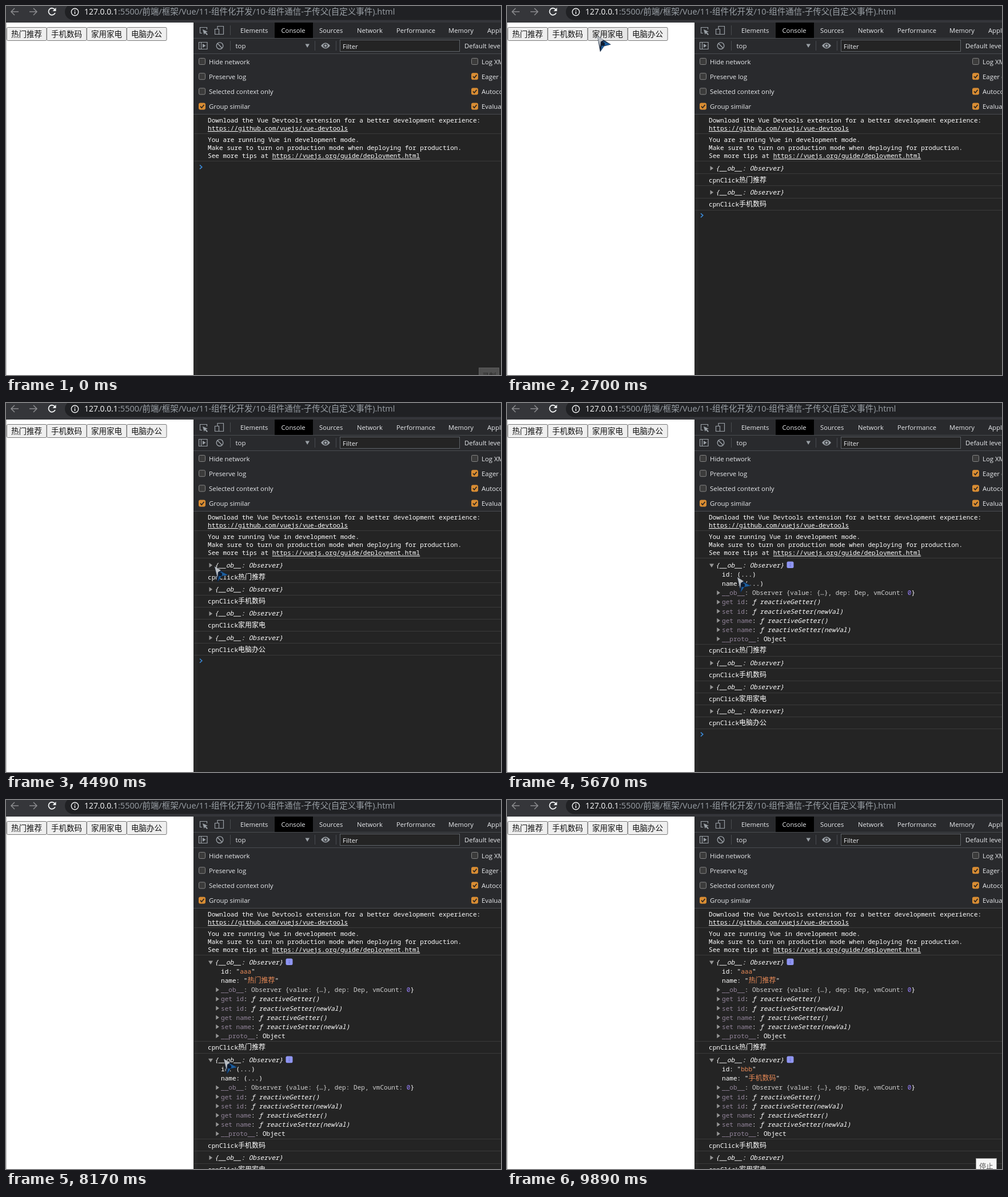
Recreate the animation shown at these times as an HTML page. Size 866 px wide and 646 px high, loop 9950 ms.

```html
<!DOCTYPE html>
<html lang="zh">
<head>
<meta charset="utf-8">
<title>Console demo</title>
<style>
html, body { margin: 0; width: 100%; height: 100%; overflow: hidden; background: #242424; }
svg { display: block; width: 100vw; height: 100vh; }
text { white-space: pre; fill: #e8eaed; font: 11.4px "Open Sans", "Noto Sans CJK SC", "Noto Sans CJK", sans-serif; }
.tab { font-size: 11.25px; }
.url { font-size: 14.5px; fill: #9aa0a6; }
.host { font-size: 13.9px; fill: #fff; }
.btn { font-size: 13.5px; fill: #111; }
.rec { font-size: 12.3px; fill: #555; }
.faint { font-size: 12.3px; fill: #2b2b2b; }
.mono { font: 500 11.05px "Noto Sans Mono", "DejaVu Sans Mono", "Noto Sans CJK SC", monospace; fill: #fff; }
.mono .han { font: 12px "Noto Sans CJK SC", "Noto Sans CJK", sans-serif; }
.link { text-decoration: underline; }
.it { font-style: italic; }
.dim { fill: #94869c; }
.soft { fill: #d0d0d0; }
.str { fill: #e98a57; }
.num { fill: #9980ff; }
</style>
</head>
<body>
<svg viewBox="0 0 866 646">
  <g id="chrome"></g>
  <g id="log"></g>
  <g id="record"></g>
  <g id="stop"></g>
  <g id="cursor">
    <path d="M0 0L24 15L12 18L5 28Z" fill="#14243c"/>
    <path d="M0 0L11 7L6 10L5 20Z" fill="#b9bdc2"/>
    <path d="M11 9L23 15L12 17L6 26L8 15Z" fill="#1d5f9f"/>
    <circle cx="10" cy="14" r="3.2" fill="#0d1b30"/>
  </g>
</svg>
<script>
const LOOP = 9950, STEP = 69.2;
const $ = id => document.getElementById(id);
const names = ['热门推荐', '手机数码', '家用家电', '电脑办公'];

const han = s => s.replace(/[\u4e00-\u9fff]+/g, m => `<tspan class="han">${m}</tspan>`);
const text = (x, y, s, cls = '') => `<text x="${x}" y="${y}" class="${cls}">${han(s)}</text>`;
const span = (cls, s) => `<tspan class="${cls}">${s}</tspan>`;
const rect = (x, y, w, h, fill, more = '') =>
  `<rect x="${x}" y="${y}" width="${w}" height="${h}" fill="${fill}" ${more}/>`;
const path = (d, stroke, w = 1.2) => `<path d="${d}" stroke="${stroke}" stroke-width="${w}" fill="none"/>`;
const shape = (d, fill) => `<path d="${d}" fill="${fill}"/>`;
const ring = (x, y, r, stroke, fill = 'none') =>
  `<circle cx="${x}" cy="${y}" r="${r}" fill="${fill}" stroke="${stroke}" stroke-width="1.4"/>`;
const rule = y => rect(329, Math.floor(y), 537, 1, '#3a3a3a');

function checkbox(x, y, label, on) {
  const edge = on ? '#d98d33' : '#858585';
  return rect(x + .5, y - 5.5, 11, 11, on ? edge : '#3b3b3b', `rx="2" stroke="${edge}"`) +
    (on ? path(`M${x + 3} ${y}l2.3 2.6l4.2 -5.2`, '#2a2420', 1.7) : '') +
    text(x + 18, y + 4.5, label);
}

function addressBar() {
  const dim = '#8a8b8e', lit = '#f1f3f4';
  return rect(0, 0, 866, 29, '#35363a') + rect(103, -4, 800, 28.5, '#202124', 'rx="14.2"') +
    path('M22 10H9M15 4L9 10L15 16M41 10H54M48 4L54 10L48 16', dim, 1.5) +
    path('M85.5 6.5A6 6 0 1 0 86 12', lit, 1.8) + shape('M87.5 3V9H81.5Z', lit) +
    ring(120.5, 10.5, 6.2, lit) + path('M120.5 9.5V14M120.5 6.8V8.2', lit, 1.5) +
    text(137, 15.3, '127.0.0.1', 'host') +
    text(196, 15.3, ':5500/前端/框架/Vue/11-组件化开发/10-组件通信-子传父(自定义事件).html', 'url');
}

function page() {
  return rect(0, 29, 328, 617, '#fff') + rect(0, 29, 1, 617, '#b8b8b8') + names.map((n, i) =>
    rect(1.5 + 70 * i, 37.5, 69.5, 23, '#efefef', `id="b${i}" rx="2" stroke="#767676"`) +
    text(9 + 70 * i, 54.3, n, 'btn')).join('');
}

function devtools() {
  const grey = '#9aa0a6', line = '#494c50', panel = '#292a2d';
  let s = rect(328, 29, 538, 161, panel) + rect(328, 190, 538, 456, '#242424') +
    rect(328, 190, 7, 456, '#282828') + rect(470, 29, 67, 27, '#000');
  for (const y of [56, 83, 189]) s += rect(328, y, 538, 1, line);
  for (const x of [392, 540, 577]) s += rect(x, 61, 1, 17, line);
  const tabs = { Elements: 410, Console: 481.5, Sources: 548, Network: 614, Performance: 683, Memory: 774, Application: 842 };
  for (const n in tabs) s += text(tabs[n], 47, n, 'tab');

  s += rect(392, 34, 1, 17, line) +
    path('M343 47.5H339.5V37.5H351.5V41', grey) +
    shape('M344 41L353 45L349.5 46L353 49.5L351.5 51L348 47.5L346.5 50Z', grey) +
    path('M370 41V35.5H380.5V49.5H373M365.5 40.5H372.5V49.5H365.5Z', grey) +
    path('M337.5 63.5H352V75.5H337.5ZM341.5 63.5V75.5', grey) + shape('M344 66L349.5 69.5L344 73Z', grey) +
    ring(374, 69.7, 5.8, grey) + path('M370 65.6L378 73.8', grey, 1.5) +
    text(401.5, 74, 'top') + shape('M523.5 66.5H531L527.2 73Z', grey) +
    shape('M551 69.5Q559 59.5 567 69.5Q559 79.5 551 69.5Z', grey) + ring(559, 69.5, 2.9, panel, grey) +
    rect(584.5, 59.5, 209, 20, '#242424', 'stroke="#5f6368"') +
    text(589, 74.5, 'Filter') + text(802, 74, 'Default levels');

  const left = ['Hide network', 'Preserve log', 'Selected context only', 'Group similar'];
  const right = ['Log XMLHttpRequests', 'Eager evaluation', 'Autocomplete from history', 'Evaluate triggers user activation'];
  left.forEach((n, i) => s += checkbox(337, 97 + 26.2 * i, n, i == 3));
  right.forEach((n, i) => s += checkbox(814, 97 + 26.2 * i, n, i > 0));

  const say = (y, ...lines) => lines.forEach((l, i) => s += text(353, y + 14.1 * i, l, 'mono'));
  say(204, 'Download the Vue Devtools extension for a better development experience:',
    span('link', 'https://github.com/vuejs/vue-devtools'));
  say(238.2, 'You are running Vue in development mode.',
    'Make sure to turn on production mode when deploying for production.',
    'See more tips at ' + span('link', 'https://vuejs.org/guide/deployment.html'));
  return s + rule(223) + rule(271);
}

// Moments of the clicks: log lines, then per object its opening and getter reads
const logAt = [1210, 2180, 2935, 3500];
const opened = [{ open: 4880, id: 5850, name: 6200 }, { open: 7820, id: 8500, name: 9040 }];
const ids = ['aaa', 'bbb'];

function members(i, t) {
  const val = (key, v) => key + ': ' + (t >= opened[i][key] ? `"${span('str', v)}"` : '(...)');
  const getter = key => span('dim', 'get ' + key) + ': ' + span('it', 'ƒ reactiveGetter()');
  const setter = key => span('dim', 'set ' + key) + ': ' + span('it', 'ƒ reactiveSetter(newVal)');
  return [
    val('id', ids[i]), val('name', names[i]),
    span('dim', '__ob__') + span('soft', ': Observer {value: {…}, dep: Dep, vmCount: ') + span('num', 0) + '}',
    getter('id'), setter('id'), getter('name'), setter('name'),
    span('dim', '__proto__') + ': Object'
  ];
}

const rightArrow = (x, y) => shape(`M${x} ${y - 4}l5.6 4l-5.6 4Z`, '#969696');

function consoleRows(t) {
  let y = 272.6, s = '';
  const endRow = () => s += rule(y += 21.17);
  names.forEach((n, i) => {
    if (t < logAt[i]) return;
    s += text(365, y + 14.9, '{__ob__: Observer}', 'mono it');
    if (opened[i] && t >= opened[i].open) {
      s += shape(`M354 ${y + 9}h8l-4 6.5Z`, '#969696') +
        rect(489.5, y + 4.8, 12, 11.6, '#9096f2', 'rx="2.5"') +
        path(`M495.5 ${y + 7.3}v1.5m0 1.2v4`, '#6d72d8', 1.4);
      members(i, t).forEach((m, j) => {
        const base = y + 31.4 + 16.15 * j;
        s += text(376, base, m, 'mono') + (j > 1 ? rightArrow(367.3, base - 4) : '');
      });
      y += 128.8;
    } else s += rightArrow(355.5, y + 11.4);
    endRow();
    s += text(353, y + 14.9, 'cpnClick' + n, 'mono');
    endRow();
  });
  return s + path(`M339 ${y + 5.8}l3.8 3.5l-3.8 3.5`, '#3b8ad8', 1.6);
}

// Hand strokes of the pointer: begin, end, where its tip comes to rest
const strokes = [
  [400, 1100, 46, 55], [1250, 1640, 105, 54], [2400, 2990, 175, 52], [3050, 3400, 240, 52],
  [3730, 4490, 365, 286], [4700, 4830, 357, 281], [5300, 6150, 424, 316], [6400, 6880, 352, 453],
  [7950, 8370, 390, 453], [8400, 8800, 421, 484], [9200, 9640, 800, 646]
];

function pointer(t) {
  let x = 860, y = 670;
  for (const [from, to, tx, ty] of strokes) {
    const u = Math.min(1, Math.max(0, (t - from) / (to - from))), ease = u * (2 - u);
    x += (tx - x) * ease;
    y += (ty - y) * ease;
  }
  return [x, y];
}

let shown = '';
function draw(now) {
  const t = Math.floor((now % LOOP + 10) / STEP) * STEP;
  const rows = consoleRows(t);
  if (rows !== shown) $('log').innerHTML = shown = rows;

  const [x, y] = pointer(t), visible = t > 400 && t < 9600;
  $('cursor').setAttribute('transform', `translate(${x} ${y})`);
  $('cursor').setAttribute('visibility', visible ? 'visible' : 'hidden');
  names.forEach((n, i) => {
    const over = visible && y > 37 && y < 61 && Math.floor((x - 1) / 70) == i;
    $('b' + i).setAttribute('fill', over ? '#e5e5e5' : '#efefef');
  });
  $('record').setAttribute('opacity', Math.max(0, 1 - t / 280));
  $('stop').setAttribute('opacity', t < 9800 ? 0 : t < 9880 ? .5 : 1);
}

$('chrome').innerHTML = addressBar() + page() + devtools();
$('record').innerHTML = rect(827.5, 633.5, 35, 20, '#505050', 'stroke="#5c5c5c"') + text(833, 651.5, '录制', 'faint');
$('stop').innerHTML = rect(820.5, 627.5, 36, 25, '#f6f6f6', 'stroke="#8a8a8a"') + text(826, 645.5, '停止', 'rec');

const start = performance.now();
(function tick() {
  draw(performance.now() - start);
  requestAnimationFrame(tick);
})();
</script>
</body>
</html>
```
